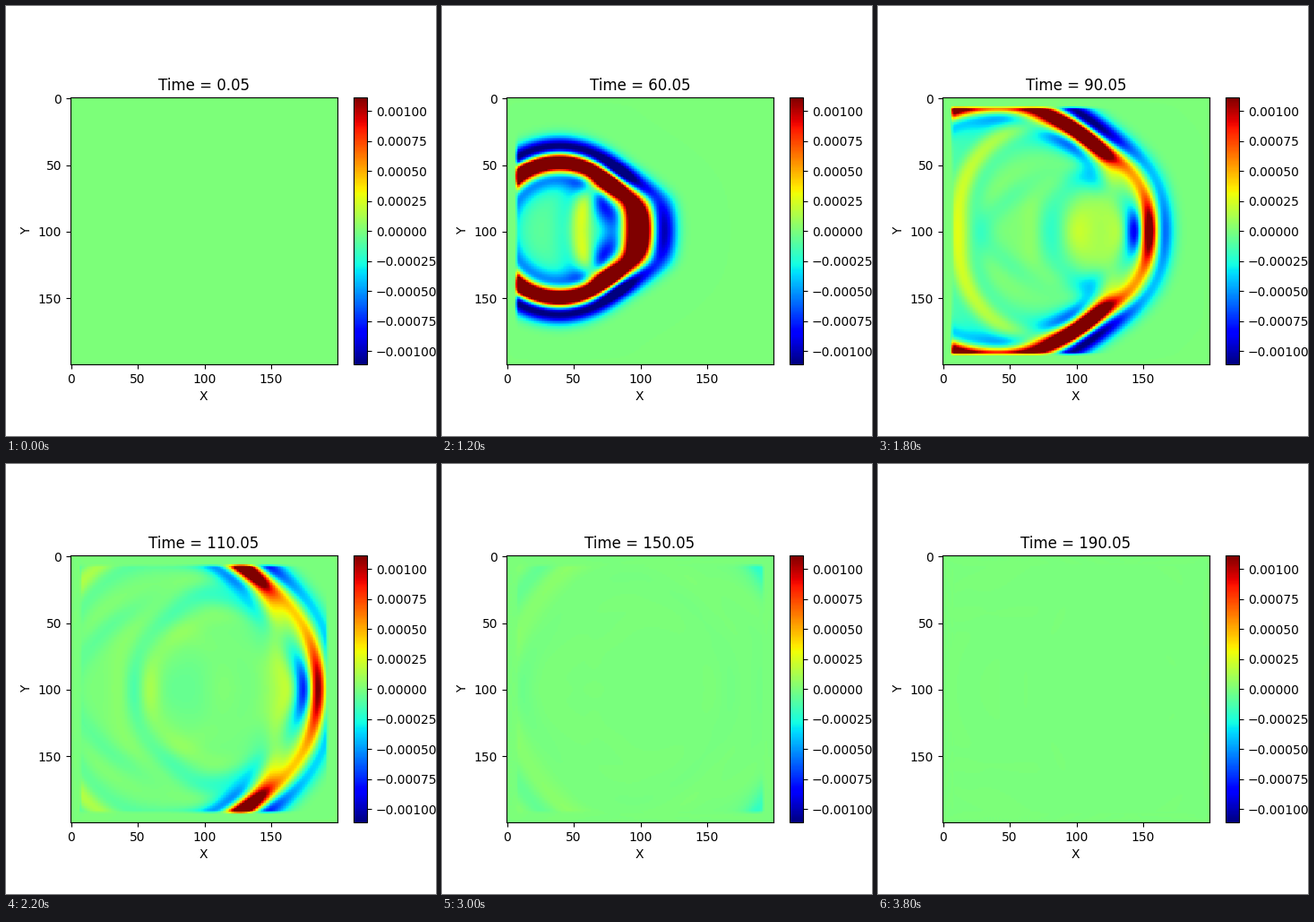
Recreate the animation shown at these times as a matplotlib script. Size 480 by 480 pixels, loop 4 s.

```python
import numpy as np
import matplotlib.pyplot as plt
from matplotlib.animation import FuncAnimation

STAGE = 480
SIZE = 200             # cells per side
DT = 0.25
FRAMES = 20
STEPS = 40             # solver steps between frames
SLOW, FAST = 1.5, 2.3  # wave speeds
FREQ, DELAY = 0.05, 24.0
AMP = 0.08
VMAX = 0.001112
SOURCE = (99, 39)
RIM, LOSS = 10, 0.1    # absorbing layer: depth and strength


def pulse(t):
    """Time integral of a Ricker wavelet."""
    t = t - DELAY
    return t * np.exp(-(np.pi * FREQ * t) ** 2)


def speed_map():
    """Fast square with soft edges in a slow medium."""
    i = np.arange(SIZE)
    box = (np.tanh((i - 73.5) / 3) - np.tanh((i - 125.5) / 3)) / 2
    return SLOW + (FAST - SLOW) * np.outer(box, box)


def damping(pos):
    depth = np.clip(np.maximum(RIM - pos, pos - (SIZE - 1 - RIM)), 0, None)
    half = LOSS * depth ** 3 * DT / 2
    return (1 - half) / (1 + half), DT / (1 + half)


def simulate():
    c2 = speed_map() ** 2
    cells = np.arange(SIZE, dtype=float)
    keep, gain = damping(cells)
    keep_v, gain_v = damping(cells[:-1] + 0.5)

    # vertical parts are stored transposed so both axes share one rule
    p = np.zeros((SIZE, SIZE))
    parts = [np.zeros((SIZE, SIZE)) for _ in range(2)]
    flows = [np.zeros((SIZE, SIZE + 1)) for _ in range(2)]
    spots = (SOURCE, SOURCE[::-1])
    shots = []
    for step in range((FRAMES - 1) * STEPS + 1):
        if step % STEPS == 0:
            shots.append(p)
        kick = DT * AMP * pulse((step + 0.5) * DT + 0.05) / 2
        for part, flow, field, c, spot in zip(
                parts, flows, (p, p.T), (c2, c2.T), spots):
            inner = flow[:, 1:-1]
            inner[:] = keep_v * inner + gain_v * np.diff(field)
            part[:] = keep * part + gain * c * np.diff(flow)
            part[spot] += kick
        p = parts[0] + parts[1].T
    return shots


def place(fig, x, y, w, h):
    """Axes from a top-left pixel box."""
    return fig.add_axes([x / STAGE, 1 - (y + h) / STAGE, w / STAGE, h / STAGE])


shots = simulate()

fig = plt.figure(figsize=(STAGE / 100, STAGE / 100), dpi=100)
ax = place(fig, 72, 102.4, 297.6, 297.6)
cax = place(fig, 388.2, 102.4, 14.9, 297.6)

image = ax.imshow(shots[0], cmap="jet", vmin=-VMAX, vmax=VMAX,
                  interpolation="nearest")
ax.set_xticks(range(0, SIZE, 50))
ax.set_yticks(range(0, SIZE, 50))
ax.set_xlabel("X")
ax.set_ylabel("Y")
title = ax.set_title("Time = 0.05")
fig.colorbar(image, cax=cax, ticks=np.arange(-4, 5) * 0.00025)


def draw(i):
    image.set_data(shots[i])
    title.set_text(f"Time = {10 * i + 0.05:.2f}")
    return image, title


anim = FuncAnimation(fig, draw, frames=FRAMES, interval=200,
                     repeat=True, repeat_delay=0)
plt.show()
```
